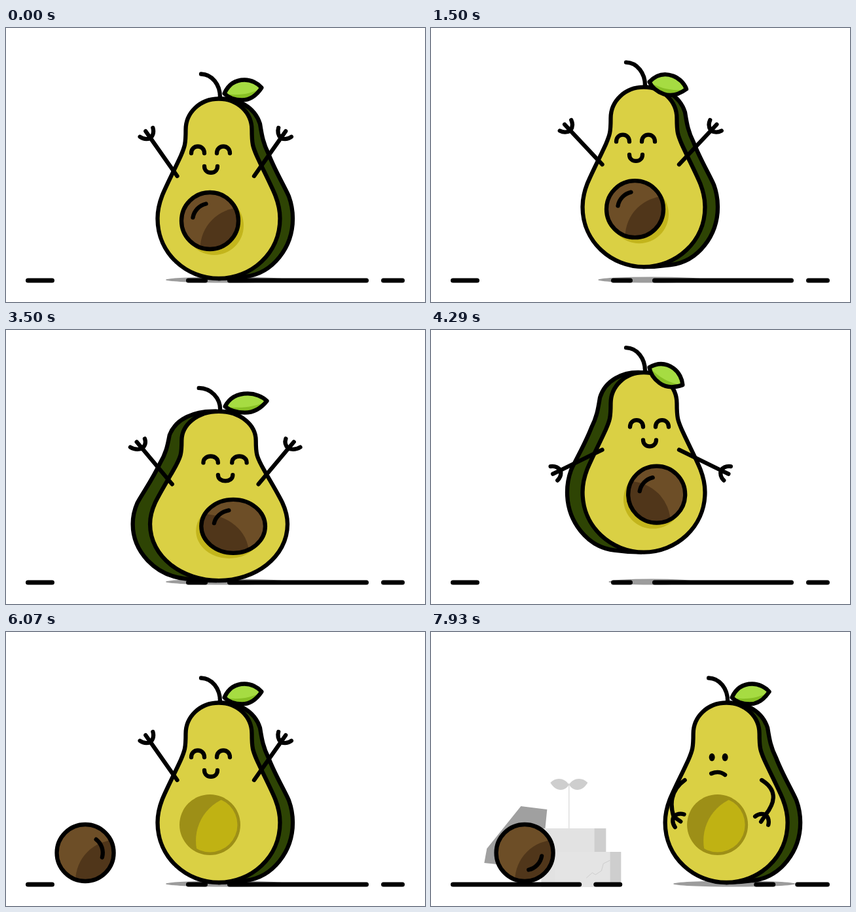
Recreate the animation shown at these times as an HTML page. Size 640x420 px, loop 8 s.

```html
<!DOCTYPE html>
<html lang="en">
<head>
<meta charset="utf-8">
<title>Avocado</title>
<style>
  html, body { margin: 0; width: 100%; height: 100%; overflow: hidden; background: #fff; }
  svg { display: block; width: 640px; height: 420px; }
  path, circle { vector-effect: non-scaling-stroke; }
  .ink { stroke: #000; stroke-width: 6.3; stroke-linecap: round; stroke-linejoin: round; }
  .line { fill: none; }
</style>
</head>
<body>
<svg viewBox="0 0 640 420">
  <defs>
    <clipPath id="pitClip"><circle r="43.5"/></clipPath>
    <clipPath id="hollowClip"><circle cx="311.5" cy="295.5" r="42"/></clipPath>
  </defs>

  <g id="props">
    <path fill="#a0a0a0" d="M81 354 85 332 137 267 177 272 168 363Z"/>
    <path fill="#e2e2e2" d="M168 301H249V391H168Z"/>
    <path fill="#cecece" d="M249 301H267V337H249Z"/>
    <path fill="#e4e4e4" d="M189 337H273V391H189Z"/>
    <path fill="#cecece" d="M273 337H290V391H273Z"/>
    <path fill="none" stroke="#cecece" d="M237 377 246 369 251 372 260 366 263 355 273 350M210.500 301V232"/>
    <path fill="#cecece" d="M210.500 234C203 223 190 222 182 231C190 245 204 245 210.500 234Z"/>
    <path fill="#cecece" d="M210.500 234C217 223 231 222 239 231C231 245 217 245 210.500 234Z"/>
  </g>

  <ellipse id="shadow" cy="386" ry="4.500" fill="#9c9c9c"/>
  <path id="ground" class="ink line" style="stroke-width:7"/>

  <g id="avocado">
    <path id="back" class="ink" fill="#2e4404" d="M325 108.500C354 107 380 121 388 147C391 166 393 177 401 193C411 219 425 242 432 258C436 269 438 280 438 292C438 336 408 376 366 381C352 383 340 384 325 384Z"/>
    <path class="ink line" d="M298 70.500C315 71 327 87 327 106"/>
    <path class="ink" fill="#dad044" d="M325 108.500C296 108.500 274.500 130 274.500 156C274.500 178 273 182 267 196C257 218 244.500 242 238.500 257C233.500 270 231.500 281 231.500 292C231.500 346 276 384 325 384C374 384 418.500 346 418.500 292C418.500 281 416.500 270 411.500 257C405.500 242 393 218 383 196C377 182 375.500 178 375.500 156C375.500 130 354 108.500 325 108.500Z"/>
    <g id="leaf">
      <path fill="#a6dc42" d="M333 100C340 84 352 79 364 79C374 79 384 84 390 91C382 103 373 110 360 110C349 110 340 107 333 100Z"/>
      <path fill="#88c024" d="M333 100C352 104 375 101 390 91C382 103 373 110 360 110C349 110 340 107 333 100Z"/>
      <path class="ink line" d="M333 100C340 84 352 79 364 79C374 79 384 84 390 91C382 103 373 110 360 110C349 110 340 107 333 100Z"/>
    </g>
    <g id="hollow">
      <circle cx="311.500" cy="295.500" r="46.500" fill="#9d8f17"/>
      <circle cx="360" cy="320" r="70" fill="#c0b213" clip-path="url(#hollowClip)"/>
    </g>
    <circle id="pitShadow" cy="303" r="45" fill="#c3b51c"/>
    <g id="happy" class="ink line">
      <path d="M283 192C283 178 303 178 303 192M322 192C322 178 342 178 342 192M303 212C303 225 323 225 323 212"/>
    </g>
    <g id="sad">
      <ellipse cx="303" cy="192" rx="4.500" ry="6"/>
      <ellipse cx="323" cy="192" rx="4.500" ry="6"/>
      <path class="ink line" d="M302 217Q314 212 323 219"/>
    </g>
    <g id="pit">
      <circle r="43.500" fill="#6d4e27"/>
      <g clip-path="url(#pitClip)"><circle id="pitShade" cy="43" r="63" fill="#50361a"/></g>
      <path id="pitShine" class="ink line" d="M-26-5A26 26 0 0 1-6-26"/>
      <circle class="ink line" r="43.500"/>
    </g>
    <path id="armL" class="ink line" transform="translate(261.5 227)"/>
    <path id="armR" class="ink line" transform="translate(379 227) scale(-1 1)"/>
  </g>
</svg>
<script>
const LOOP = 8000, CYCLE = 2570, LAST = 2 * CYCLE;
const el = {};
document.querySelectorAll('[id]').forEach(n => el[n.id] = n);
const set = (name, attr, value) => el[name].setAttribute(attr, value);

const clamp = (v, a, b) => Math.min(b, Math.max(a, v));
const mix = (a, b, k) => a + (b - a) * k;
const ramp = (t, a, b) => clamp((t - a) / (b - a), 0, 1);
const smooth = (t, a, b) => (1 - Math.cos(Math.PI * ramp(t, a, b))) / 2;

// Eased value through [time, value] pairs.
function keys(t, list) {
  let v = list[0][1];
  for (let i = 1; i < list.length; i++) {
    v += (list[i][1] - list[i - 1][1]) * smooth(t, list[i - 1][0], list[i][0]);
  }
  return v;
}

// Arm pose: bend point x, y, wrist x, y, hand angle in degrees.
function straightArm(lift) {
  const angle = 180 + lift, r = angle * Math.PI / 180;
  const x = 71 * Math.cos(r), y = 71 * Math.sin(r);
  return [x / 2, y / 2, x, y, angle];
}
const mixPose = (a, b, k) => a.map((v, i) => mix(v, b[i], k));
const HANG_L = [-38, 0, -47, 39, 72], HANG_R = [-33, 2, -38, 39, 90];
const HOLD_L = [-28, 20, -17, 56, 35], HOLD_R = [-32, 20, -6, 53, 57];

function armPath([cx, cy, wx, wy, angle]) {
  const r = angle * Math.PI / 180, c = Math.cos(r), s = Math.sin(r);
  const p = (x, y) => `${(wx + x * c - y * s).toFixed(2)} ${(wy + x * s + y * c).toFixed(2)}`;
  return `M0 0Q${cx} ${cy} ${p(0, 0)}L${p(13, 0)}` +
    `M${p(11, -12)}Q${p(2, -9)} ${p(0, 0)}Q${p(2, 9)} ${p(11, 12)}`;
}

const DASHES = [[-400, 8.5], [33.5, 70.5], [278.5, 304.5], [341.5, 550.5], [576.5, 900]];
function groundPath(shift) {
  return DASHES.map(([a, b]) => [Math.max(33.5, a + shift), Math.min(605.5, b + shift)])
    .filter(([a, b]) => b >= a).map(([a, b]) => `M${a} 387H${b}`).join('');
}

function pitDrop(u) {
  if (u < 500) return -0.1426 * u + 0.000457 * u * u;
  return 43 - 10 * Math.sin(Math.PI * ramp(u, 500, 760));
}

function draw(t) {
  const jumping = t < LAST;
  const u = jumping ? t % CYCLE : t - LAST;
  const first = t < CYCLE;

  const lift = jumping ? keys(u, [[1210, 0], [2010, 61], [2450, 0]]) : 0;
  const squash = keys(u, [[0, 0], [150, 1], [640, 0]]) +
    (jumping ? keys(u, [[640, 0], [1000, 0.8], [1290, 0]]) : 0);
  const turn = smooth(u, 1800, 2400);
  const side = !jumping ? 1 : first ? 1 - 2 * turn : 2 * turn - 1;
  const scroll = ramp(t, 7010, 7930) + Math.max(0, t - 7930) / 920;

  const avocadoX = 126 * scroll;
  set('avocado', 'transform',
    `translate(${325 + avocadoX} ${387 - lift}) scale(${1 + 0.168 * squash} ${1 - 0.08 * squash}) translate(-325 -387)`);
  set('back', 'transform', `translate(323 0) scale(${side || 0.001} 1) translate(-323 0)`);
  const leafTilt = jumping
    ? keys(u, [[1260, 0], [1720, 37], [1850, 37], [2280, -28], [2480, -9], [2570, 0]]) : 0;
  set('leaf', 'transform', `translate(0.5 0.5) rotate(${leafTilt} 333 100)`);

  set('shadow', 'cx', 337 + avocadoX);
  set('shadow', 'rx', 93 * (1 - 0.0068 * lift));
  set('ground', 'd', groundPath(218 * scroll));
  set('props', 'transform', `translate(${310 * (scroll - 1)} 0)`);

  // Pit: in its hollow, then out and rolling away to the left.
  const away = jumping ? 0 : Math.sin(Math.PI / 2 * ramp(u, 40, 1730));
  const roll = Math.max(0, (away - 0.1) / 0.9);
  const pitX = 311.5 + 16.6 * (1 - side) - 258.5 * away - 36 * scroll;
  const pitY = 295.5 + (jumping ? 0 : pitDrop(u));
  set('pit', 'transform', `translate(${pitX} ${pitY})`);
  set('pitShade', 'cx', 3 + 45 * side);
  set('pitShine', 'transform', `rotate(${-342 * roll - 198 * scroll})`);
  set('pitShadow', 'cx', 328.5 - 10.5 * side);
  set('pitShadow', 'visibility', jumping ? 'visible' : 'hidden');
  set('hollow', 'visibility', jumping ? 'hidden' : 'visible');

  const isSad = t >= 6200;
  set('happy', 'visibility', isSad ? 'hidden' : 'visible');
  set('sad', 'visibility', isSad ? 'visible' : 'hidden');
  set('happy', 'transform', `translate(${10.5 * (1 - side)} 0)`);

  const wave = jumping ? keys(u, [[1440, 55], [1740, -27], [1900, -27], [2500, 54], [2570, 55]]) : 55;
  const fall = smooth(t, 6120, 6700), hold = smooth(t, 7050, 7700);
  const up = straightArm(mix(wave, -45, fall));
  set('armL', 'd', armPath(mixPose(up, mixPose(HANG_L, HOLD_L, hold), fall)));
  set('armR', 'd', armPath(mixPose(up, mixPose(HANG_R, HOLD_R, hold), fall)));
}

const start = performance.now();
function tick() {
  draw((performance.now() - start) % LOOP);
  requestAnimationFrame(tick);
}
tick();
</script>
</body>
</html>
```
